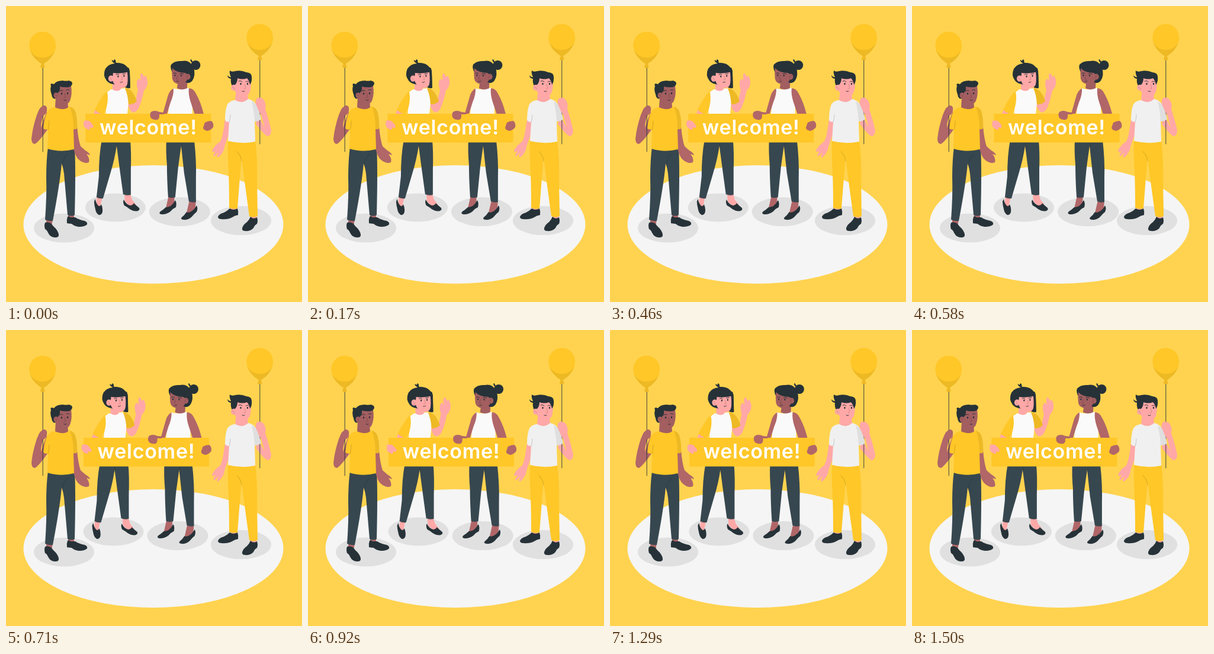
An HTML page for the animation above (1540 ms loop, 500 by 500 pixels).

```html
<!DOCTYPE html>
<html lang="en">
<head>
<meta charset="utf-8">
<title>Welcome</title>
<style>
html, body { margin: 0; width: 100%; height: 100%; overflow: hidden; background: #ffd34f; }
svg { display: block; width: 100vw; height: 100vh; }
.gold { fill: #ffc727; }
.ink { fill: #263238; }
.slate { fill: #37474f; }
.white { fill: #fafafa; }
.tee { fill: #f0f0f0; }
.brown { fill: #b16668; }
.face { fill: #a35e60; }
.pink { fill: #ffa8a7; }
.dim { fill: #000; opacity: .07; }
.shadow { fill: #e0e0e0; }
.line { fill: none; stroke: #263238; stroke-width: .9; stroke-linecap: round; }
.fold { fill: none; stroke: #000; stroke-opacity: .22; stroke-width: .8; stroke-linecap: round; }
.sign { font: 600 34px Inter, sans-serif; letter-spacing: .7px; fill: #fff; text-anchor: middle; }
</style>
</head>
<body>
<svg viewBox="0 0 500 500">
  <defs>
    <g id="balloon">
      <path class="gold" d="M0 0C13 0 22.300 10 22.300 23C22.300 38 10 49 2 54L4 60Q0 62 -4 60L-2 54C-10 49 -22.300 38 -22.300 23C-22.300 10 -13 0 0 0Z"/>
      <path class="dim" d="M-21.500 30C-14 47 10 49 20.500 32C17 43 9 50 2 54L4 60Q0 62 -4 60L-2 54C-9 49 -19 41 -21.500 30Z"/>
    </g>
  </defs>

  <rect width="500" height="500" fill="#ffd34f"/>
  <ellipse cx="249" cy="369" rx="219.500" ry="100" fill="#f5f5f5"/>
  <ellipse class="shadow" cx="98" cy="375" rx="51" ry="24.500"/>
  <ellipse class="shadow" cx="397" cy="362.500" rx="51" ry="24.500"/>

  <!-- man on the left -->
  <g>
    <path class="brown" d="M68 357L79 360L77 372L68 370ZM105 350L115 352L115 361L105 359Z"/>
    <path class="ink" d="M66 366Q70 364 76 367L80 372Q88 379 89 386Q90 391 83 391Q75 391 71 383Q69 378 66 377Q64 371 66 366Z"/>
    <path class="ink" d="M104 356Q106 354 109 357L117 357Q123 361 133 363Q138 365 137 369Q133 373 123 373Q115 372 111 368L103 367Q102 361 104 356Z"/>
    <path class="slate" d="M71 238L116 238Q118 274 116 353Q110 356 104 353L98 283Q97 274 94 266Q91 300 79 363Q73 364 66 361Q69 320 68 290Q68 260 71 238Z"/>
    <path class="fold" d="M95 268Q97 256 105 249"/>
    <path class="brown" d="M112 199L120 203Q122 226 126 237L134 244Q141 248 142 252L136 250Q142 258 140 264Q134 267 126 262Q119 257 117 250Q112 238 113 220Z"/>
    <path class="brown" d="M69 178Q64 190 59 206Q59 196 63 185Q69 181 69 174Q68 168 64 168Q57 171 55 177L52 184Q45 205 43 224Q43 233 49 233Q56 229 72 206Z"/>
    <path class="line" d="M62.200 104V246"/>
    <path class="brown" d="M56 177Q60 169 65 168Q70 169 69 176Q68 183 63 185L56 184Z"/>
    <path class="gold" d="M83 171Q97 174 108 170Q116 172 118 181Q121 194 120 207Q117 209 114 208L115 242Q92 248 70 241L71 209Q66 209 63 207Q65 188 70 178Q74 172 83 171Z"/>
    <path class="dim" d="M108 170Q116 172 118 181Q121 194 120 207Q117 209 114 208Q114 186 108 170Z"/>
    <path class="fold" d="M71 209Q73 202 73 194"/>
    <path class="face" d="M84 153L104 160L105 171Q100 175 93 174Q86 173 83 171Z"/>
    <path class="face" d="M84 137Q98 131 110 135Q112 148 109 157Q107 165 101 166Q91 165 86 157Z"/>
    <path class="ink" d="M76 135Q74 131 78 131Q80 132 81 132Q85 126 96 126Q101 127 106 126Q112 127 112 131Q111 136 106 137Q98 138 91 136Q92 143 88 146L85 155Q83 158 80 156Q77 153 77 149Q74 142 76 135Z"/>
    <ellipse class="face" cx="84.500" cy="151" rx="4" ry="4.800"/>
    <ellipse class="ink" cx="94" cy="148" rx="1.200" ry="1.700"/>
    <ellipse class="ink" cx="104" cy="147.500" rx="1.200" ry="1.700"/>
    <path class="line" d="M90 144Q93 141 96 143M102 142Q105 140 107 142M98 159Q100 160 102 159"/>
    <path class="fold" d="M99 148L101 154L98 155M83 150Q86 150 86 153"/>
    <use href="#balloon" x="61.800" y="43.500"/>
  </g>

  <!-- moving pair with the banner -->
  <g id="pair">
    <ellipse class="shadow" cx="185" cy="340.500" rx="51" ry="24"/>
    <ellipse class="shadow" cx="293.500" cy="347.500" rx="51.500" ry="24.500"/>

    <path class="pink" d="M154 320L163 322L160 336L162 346L152 337ZM200 316L210 317L213 327L220 336L211 339L201 330Z"/>
    <path class="ink" d="M151 326Q152 334 157 338Q160 338 161 335Q164 341 163 348Q162 353 157 353Q152 350 151 343Q149 336 149 330Z"/>
    <path class="ink" d="M199 327Q203 335 210 337Q215 336 216 333Q220 337 225 341Q227 344 223 346Q217 348 209 343Q204 339 200 337Q197 332 199 327Z"/>
    <path class="slate" d="M162 226H210Q212 248 211 277L211 319Q204 321 198 318L192 274L187 236Q184 258 176 284L164 325Q158 326 153 323L157 288Q157 252 162 226Z"/>
    <path class="fold" d="M187 240L188 231"/>

    <path class="brown" d="M275 320L285 321L284 333L276 343L270 342ZM310 328L321 329L320 341L310 351L305 350Z"/>
    <path class="ink" d="M286 328Q283 334 278 338Q273 340 270 340Q266 344 261 347Q257 351 263 352Q272 352 278 347Q282 342 287 340Q289 333 286 328Z"/>
    <path class="ink" d="M322 337Q319 343 313 347Q308 350 305 348Q302 353 297 357Q294 360 300 361Q308 362 314 356Q319 350 322 348Q325 341 322 337Z"/>
    <path class="slate" d="M271 226H318Q322 262 321 290L321 331Q315 333 309 330L301 282L296 236L291 272L286 323Q280 325 274 323Q272 292 272 268Q270 246 271 226Z"/>
    <path class="fold" d="M296 240L298 231"/>

    <!-- waving woman -->
    <path class="pink" d="M206 164L216 158L219 160Q221 151 223 142Q221 137 221 131Q221 124 225 123L228 126Q226 118 228 114Q230 113 232 117L233 120Q235 117 237 119Q240 126 239 132Q238 138 233 143Q230 159 224 173Q219 181 213 179Q207 174 206 164Z"/>
    <path class="pink" d="M152 172L166 178L160 186L147 186Z"/>
    <path class="white" d="M177 141L202 139Q208 146 208 155L205 183H169L168 146Z"/>
    <path class="gold" d="M177 141Q170 142 165 150Q157 161 150 175Q156 181 164 183L169 175Q174 157 171 145Z"/>
    <path class="gold" d="M201 139Q208 139 213 145Q219 153 221 161Q215 167 207 166Q206 149 201 139Z"/>
    <path class="dim" d="M201 139Q208 139 213 145Q219 153 221 161Q215 167 207 166Q206 149 201 139Z"/>
    <path class="pink" d="M180 127L194 133L194 141Q188 146 180 141Z"/>
    <path class="ink" d="M184 97Q178 94 179 91L182 93Q182 89 185 91L186 96Q204 95 209 111L210 138Q205 140 201 137L181 132Q174 131 170 126Q163 117 168 106Q173 98 184 97Z"/>
    <path class="pink" d="M180 113Q193 113 207 108L207 119Q207 131 203 136Q197 141 188 137Q181 132 180 124Z"/>
    <path class="ink" d="M176 106Q193 96 208 105L209 111Q193 115 181 113Q181 120 178 122Z"/>
    <ellipse class="pink" cx="177.500" cy="122.500" rx="4.500" ry="5.200"/>
    <path class="ink" d="M205 111L209 108Q210 125 209.500 139L204 138Q207 127 205 111Z"/>
    <ellipse class="ink" cx="189.500" cy="119" rx="1.100" ry="1.700"/>
    <ellipse class="ink" cx="199.500" cy="118" rx="1.100" ry="1.700"/>
    <path class="line" d="M186 116Q189 114 191 116M197 115L202 114M193 129Q195 130 197 128"/>
    <path class="fold" d="M195 118L197 124L194 125M175.500 121Q179 121 178 126"/>

    <!-- woman with the bun -->
    <path class="white" d="M282 139Q294 143 308 138L313 143Q312 157 315 166L315 183H274L276 161Q283 150 282 139Z"/>
    <path class="brown" d="M283 139Q275 144 273 154L265 182H272L278 163Q284 149 283 139ZM309 139Q317 139 321 148Q329 162 334 182L337 190L319 183L312 162Q308 150 309 139Z"/>
    <path class="face" d="M291 125L307 121L306 139Q297 143 289 139Z"/>
    <circle class="ink" cx="320.500" cy="100" r="8"/>
    <path class="ink" d="M279 99Q285 92 297 93Q307 91 313 98L317 104Q321 117 315 126Q310 132 304 129L292 117L281 112Q277 104 279 99Z"/>
    <path class="ink" d="M313 95Q310 90 313 90L316 95Z"/>
    <path class="face" d="M281 105Q289 113 303 113L307 116L306 125Q301 133 292 132Q283 131 281 123Q280 113 281 105Z"/>
    <ellipse class="face" cx="307.500" cy="119.500" rx="4.200" ry="5"/>
    <ellipse class="ink" cx="285.500" cy="117" rx="1.100" ry="1.600"/>
    <ellipse class="ink" cx="296" cy="117.500" rx="1.100" ry="1.600"/>
    <path class="line" d="M283 113.500Q285 112 288 114M294 114.500Q297 113 300 115M288 127Q290 128 292 127"/>
    <path class="fold" d="M290 117L288 123L291 124M306 122Q305 117 309 117"/>

    <rect class="gold" x="134.500" y="182" width="212" height="48.500"/>
    <text class="sign" x="240.500" y="217">welcome!</text>
    <path class="pink" d="M132 194Q138 192 142 195L147 201Q149 205 146 206L142 205Q143 210 139 209Q132 206 131 200Z"/>
    <path class="brown" d="M245 179Q251 175 259 179L267 180V183H259Q260 190 256 192Q249 193 245 189Q242 184 245 179Z"/>
    <path class="brown" d="M336 197Q341 194 347 194Q352 199 350 205Q346 210 340 211L335 209Q332 206 334 203Z"/>
  </g>

  <!-- man on the right -->
  <g>
    <path class="pink" d="M379 337L389 338L389 348L379 349ZM413 351L424 351L423 362L413 364Z"/>
    <path class="ink" d="M391 342Q393 347 392 353Q386 354 382 357Q374 361 364 360Q358 360 358 356Q360 351 368 349Q374 346 378 342Q384 346 391 342Z"/>
    <path class="ink" d="M424 357Q426 363 424 368Q420 370 418 375Q413 381 404 380Q398 380 399 375Q401 369 407 365Q411 361 413 356Q418 361 424 357Z"/>
    <path class="gold" d="M375 226H421Q425 260 424 291L425 355Q418 358 411 355L403 296L398 256L395 290L391 342Q384 344 377 341Q377 306 376 280Q374 250 375 226Z"/>
    <path class="fold" d="M398 262Q397 252 390 246"/>
    <path class="pink" d="M370 191L379 194Q379 213 373 226Q369 236 368 243Q364 252 358 256L356 254L359 247L352 254L350 252L354 245L349 247L348 244Q354 233 362 229Q366 220 367 211Z"/>
    <path class="pink" d="M426 185Q434 200 437 205Q434 195 431 183Q424 180 422 172Q420 160 425 156Q432 153 436 160Q440 166 438 174Q445 196 448 210Q448 219 442 220Q436 218 422 199Z"/>
    <path class="line" d="M428.800 91V233"/>
    <path class="pink" d="M422 160Q423 154 429 155Q436 157 438 165L438 179L430 181Q423 179 422 172Z"/>
    <path class="tee" d="M387 159Q397 162 409 157Q419 159 423 168Q429 181 431 191Q427 195 420 195L421 229Q398 234 375 228L377 196Q372 196 370 193Q370 175 374 166Q378 160 387 159Z"/>
    <path class="dim" d="M415 161Q420 163 423 168Q429 181 431 191Q427 195 420 195Q419 177 415 161Z"/>
    <path class="fold" d="M377 196Q379 190 379 184"/>
    <path class="pink" d="M389 141L408 149L409 157Q403 163 396 162Q389 161 387 158Z"/>
    <path class="pink" d="M386 120Q400 115 413 121Q415 135 412 145Q408 154 401 154Q391 151 386 143Z"/>
    <path class="ink" d="M374 117Q377 121 380 120Q377 114 378 109Q381 112 387 110Q397 108 406 112Q415 113 415 119Q416 128 412 133Q411 126 407 122Q399 125 391 122Q391 129 387 133L382 135Q379 129 380 123Q374 122 374 117Z"/>
    <ellipse class="pink" cx="384.500" cy="138" rx="4.500" ry="5"/>
    <ellipse class="ink" cx="396.500" cy="131.500" rx="1.200" ry="1.700"/>
    <ellipse class="ink" cx="408" cy="131.500" rx="1.200" ry="1.700"/>
    <path class="line" d="M393 127Q396 125 399 128M405 128Q408 126 410 128M399 144Q401 145 403 144"/>
    <path class="fold" d="M403 132L405 139L402 140M382 137Q386 137 386 141"/>
    <use href="#balloon" x="428.800" y="30.500"/>
  </g>
</svg>
<script>
const LOOP = 1540, CYCLE = 1500, FPS = 24, LEAD = 12.5;
const stops = [0, -1, 2, -4, 4, -4, 4, -4, 2, -1, 0];
const pair = document.getElementById('pair');

// cubic-bezier(0, 0, .58, 1), solved for its parameter by bisection
function easeOut(x) {
  let lo = 0, hi = 1, s = .5;
  for (let i = 0; i < 20; i++) {
    s = (lo + hi) / 2;
    if (1.74 * s * s * (1 - s) + s * s * s < x) lo = s; else hi = s;
  }
  return s * s * (3 - 2 * s);
}

function shake(ms) {
  const pos = (ms + LEAD) % CYCLE / CYCLE * (stops.length - 1);
  const i = Math.floor(pos);
  return stops[i] + (stops[i + 1] - stops[i]) * easeOut(pos - i);
}

function draw(now) {
  const step = Math.floor((now % LOOP + 5) * FPS / 1000);
  const x = shake(Math.min(step, 36) * 1000 / FPS);
  pair.setAttribute('transform', `translate(${x.toFixed(3)} 0)`);
}

let start;
function tick(now) {
  start ??= now;
  draw(now - start);
  requestAnimationFrame(tick);
}
draw(0);
requestAnimationFrame(tick);
</script>
</body>
</html>
```
